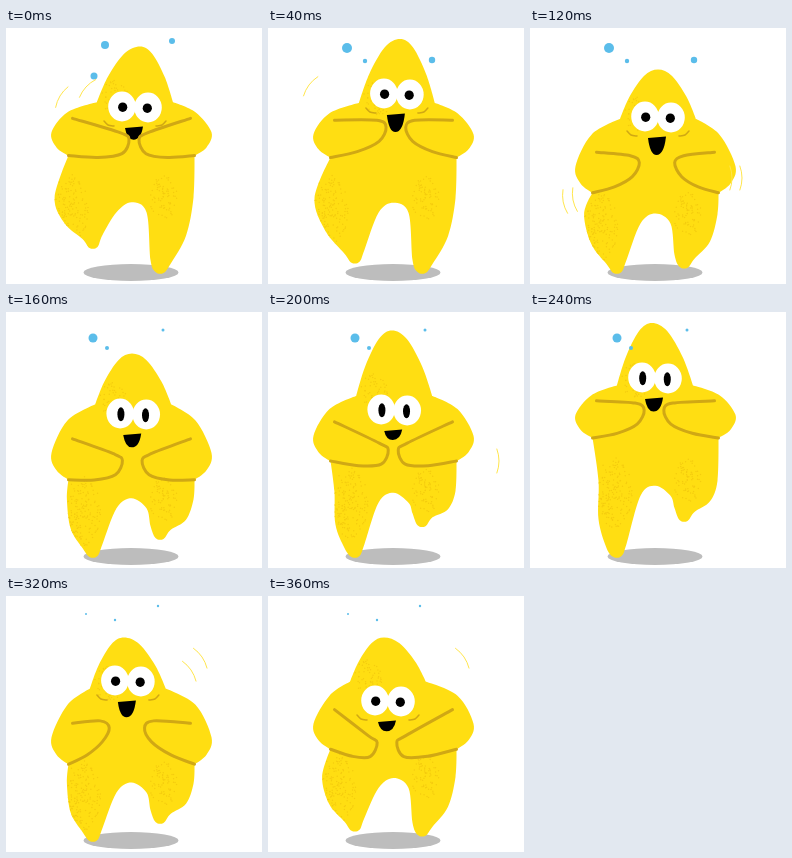
Write an HTML page with a canvas that moves like this. It is 256 by 256 pixels and loops after 400 ms.

```html
<!DOCTYPE html>
<html lang="en">
<head>
<meta charset="utf-8">
<title>Dancing star</title>
<style>
html, body { margin: 0; width: 100%; height: 100%; overflow: hidden; background: #fff; }
canvas { display: block; width: 100vw; height: 100vh; }
</style>
</head>
<body>
<canvas width="256" height="256"></canvas>
<script>
const ctx = document.querySelector('canvas').getContext('2d');
const STEP = 40, STEPS = 10, TURN = Math.PI * 2, MID = 125.5;
const YELLOW = '#ffde12', LINE = '#d0a814', SPECK = '#f4cc0e', BLUE = '#5bbdea', SPARK = '#ffe64d';

// Height of the eyes at each step: the face bounces on its own.
const EYE_Y = [79, 66, 71, 89, 102, 98, 66, 72, 85, 105];

// Sweat drops (x, y, radius); each set holds for three steps.
const DROPS = [
  [[99, 17, 4], [166, 13, 3], [88, 48, 3.5]],
  [[79, 20, 5], [97, 33, 2.2], [164, 32, 3.2]],
  [[87, 26, 4.5], [101, 36, 2], [157, 18, 1.5]],
  [[80, 18, 1], [109, 24, 1.2], [152, 10, 1.2]]
];

// Speed lines: first step, last step, x, y, facing, count.
const STREAKS = [
  [0, 0, 54, 68, -2.6, 1], [0, 0, 80, 59, -2.4, 1], [1, 2, 41, 57, -2.5, 1],
  [2, 3, 43, 172, 2.95, 2], [3, 3, 202, 150, 0, 2], [5, 5, 231, 149, 0, 1],
  [8, 8, 185, 74, -0.6, 1], [8, 9, 196, 61, -0.6, 1]
];

const lerp = (a, b, t) => a + (b - a) * t;
const mix = (a, b, t) => [lerp(a[0], b[0], t), lerp(a[1], b[1], t)];
const add = (p, x, y) => [p[0] + x, p[1] + y];
const corner = p => [...p, true];
const noise = n => { const s = Math.sin(n * 127.1) * 43758.5453; return s - Math.floor(s); };

// Smooth rise and fall around a step, wrapping with the loop.
function bump(step, center, half) {
  const gap = Math.abs(step - center);
  const d = Math.min(gap, STEPS - gap) / half;
  return d < 1 ? Math.cos(d * Math.PI / 2) ** 2 : 0;
}

function poseAt(step) {
  const loop = step / STEPS * TURN;
  const beat = 2 * (loop - TURN / STEPS);
  const hop = 2 * loop - 1.075 + 0.585 * Math.cos(loop); // two hops, the second quicker
  const lift = Math.cos(hop);
  const pose = {
    apex: [134 - 2 * step, 26.2 - 17.9 * Math.cos(beat) + 2.7 * Math.cos(2 * beat)],
    eyes: [129 - step * step / 9, EYE_Y[step]],
    neckY: 83 - 10 * lift,
    elbowY: 122 - 20 * lift,
    armpitY: 147 - 22 * lift,
    leanLeft: 11 * Math.cos(loop - TURN / STEPS),
    handGap: 12 - 7 * Math.cos(2 * loop),
    mouthDepth: 14 + 5 * Math.sin(hop),
    footLift: { '-1': 25 * bump(step, 0, 1.8), 1: 36 * bump(step, 6, 4) },
    startled: Math.ceil(step / 3) === 2
  };
  pose.handY = pose.eyes[1] + 0.35 * pose.armpitY - 12;
  pose.crotch = [MID, 136 + 0.3 * pose.armpitY];
  return pose;
}

// Joints of one half of the body; dir is -1 for left and 1 for right.
function joints(pose, dir) {
  const at = (offset, y) => [MID + dir * offset, y];
  return {
    neck: [pose.eyes[0] + dir * 38, pose.neckY],
    elbow: at(80, pose.elbowY),
    armpit: at(63, pose.armpitY),
    hip: at(dir < 0 ? 68 + pose.leanLeft : 62, 112 + 0.45 * pose.armpitY),
    foot: at(dir < 0 ? 39 : 29, 245 - pose.footLift[dir]),
    hand: [pose.eyes[0] - 1 + dir * pose.handGap, pose.handY]
  };
}

function halfOutline(pose, dir) {
  const { neck, elbow, armpit, hip, foot } = joints(pose, dir);
  const { apex, crotch } = pose;
  const heel = add(foot, dir * 10, -9);
  return [
    [lerp(apex[0], neck[0], 0.37), lerp(apex[1], neck[1], 0.13)],
    [lerp(apex[0], neck[0], 0.75), lerp(apex[1], neck[1], 0.55)],
    corner(neck),
    [elbow[0] - dir * 16, lerp(neck[1], elbow[1], 0.33)],
    elbow,
    [elbow[0] - dir * 5, lerp(elbow[1], armpit[1], 0.65)],
    corner(armpit),
    hip,
    add(mix(hip, heel, 0.5), dir * 4, 5),
    heel,
    add(foot, dir * 3, 0),
    add(foot, -dir * 5, -1),
    add(foot, -dir * 10, -13),
    add(crotch, dir * 15, 10)
  ];
}

function smooth(points, closed) {
  const n = points.length;
  const at = i => points[closed ? (i + n) % n : Math.max(0, Math.min(n - 1, i))];
  const slope = i => {
    if (at(i)[2]) return [0, 0];
    const a = at(i - 1), b = at(i + 1);
    return [(b[0] - a[0]) / 6, (b[1] - a[1]) / 6];
  };
  const path = new Path2D();
  path.moveTo(points[0][0], points[0][1]);
  for (let i = 0; i < (closed ? n : n - 1); i++) {
    const p = at(i), q = at(i + 1), u = slope(i), v = slope(i + 1);
    path.bezierCurveTo(p[0] + u[0], p[1] + u[1], q[0] - v[0], q[1] - v[1], q[0], q[1]);
  }
  return path;
}

function oval(x, y, rx, ry, color) {
  ctx.fillStyle = color;
  ctx.beginPath();
  ctx.ellipse(x, y, rx, ry, 0, 0, TURN);
  ctx.fill();
}

function stroke(path, color, width) {
  ctx.strokeStyle = color;
  ctx.lineWidth = width;
  ctx.stroke(path);
}

function stipple([x, y], rx, ry, seed) {
  for (let i = 0; i < rx * ry / 4; i++) {
    const angle = noise(seed + i) * TURN, reach = Math.sqrt(noise(seed + i + 500));
    oval(x + rx * reach * Math.cos(angle), y + ry * reach * Math.sin(angle), 0.75, 0.75, SPECK);
  }
}

function drawBody(pose) {
  const right = halfOutline(pose, 1), left = halfOutline(pose, -1).reverse();
  const shape = smooth([pose.apex, ...right, pose.crotch, ...left], true);
  ctx.fillStyle = YELLOW;
  ctx.fill(shape);
  ctx.save();
  ctx.clip(shape);
  stipple(add(joints(pose, -1).hip, 16, 12), 18, 36, 10);
  stipple(add(joints(pose, 1).hip, -30, 0), 14, 22, 400);
  stipple(add(joints(pose, -1).neck, 18, -4), 14, 18, 900);
  ctx.restore();
}

function drawArm(pose, dir) {
  const { elbow, hand, armpit } = joints(pose, dir);
  const under = add(hand, dir * 7, 14);
  stroke(smooth([
    add(elbow, -dir * 21, -14),
    add(hand, dir * 9, -7),
    hand,
    under,
    add(mix(under, armpit, 0.45), 0, 3),
    armpit
  ]), LINE, 3);
}

function drawFace({ eyes: [x, y], mouthDepth, startled }) {
  const [rx, ry] = startled ? [3.5, 7] : [4.6, 4.8];
  for (const dir of [-1, 1]) oval(x + dir * 13, y + dir * 0.5, 13.8, 15, '#fff');
  for (const dir of [-1, 1]) oval(x + dir * 12.3, y + 0.7 + dir * 0.5, rx, ry, '#000');

  const left = x - 10, right = x + 8, top = y + 21, bottom = top + mouthDepth;
  ctx.fillStyle = '#000';
  ctx.beginPath();
  ctx.moveTo(left, top);
  ctx.lineTo(right, top - 1.5);
  ctx.quadraticCurveTo(right - 2, bottom, x - 1.5, bottom);
  ctx.quadraticCurveTo(left + 2, bottom, left, top);
  ctx.fill();

  if (startled) return;
  for (const dir of [-1, 1])
    stroke(smooth([[x + dir * 31, y + 14], [x + dir * 27, y + 18], [x + dir * 21, y + 19]]), LINE, 1.5);
}

function drawStreaks(step) {
  for (const [first, last, x, y, facing, count] of STREAKS) {
    if (step < first || step > last) continue;
    for (let i = 0; i < count; i++) {
      const radius = 35, out = i * 10 - radius, path = new Path2D();
      path.arc(x + out * Math.cos(facing), y + out * Math.sin(facing), radius, facing - 0.35, facing + 0.35);
      stroke(path, SPARK, 1);
    }
  }
}

function draw(step) {
  const pose = poseAt(step);
  ctx.fillStyle = '#fff';
  ctx.fillRect(0, 0, 256, 256);
  ctx.lineCap = ctx.lineJoin = 'round';
  oval(125, 244.5, 47.5, 8.5, '#bdbdbd');
  drawBody(pose);
  drawFace(pose);
  for (const dir of [-1, 1]) drawArm(pose, dir);
  for (const [x, y, r] of DROPS[Math.ceil(step / 3)]) oval(x, y, r, r, BLUE);
  drawStreaks(step);
}

function tick() {
  draw(Math.floor(performance.now() / STEP) % STEPS);
  requestAnimationFrame(tick);
}
tick();
</script>
</body>
</html>
```
